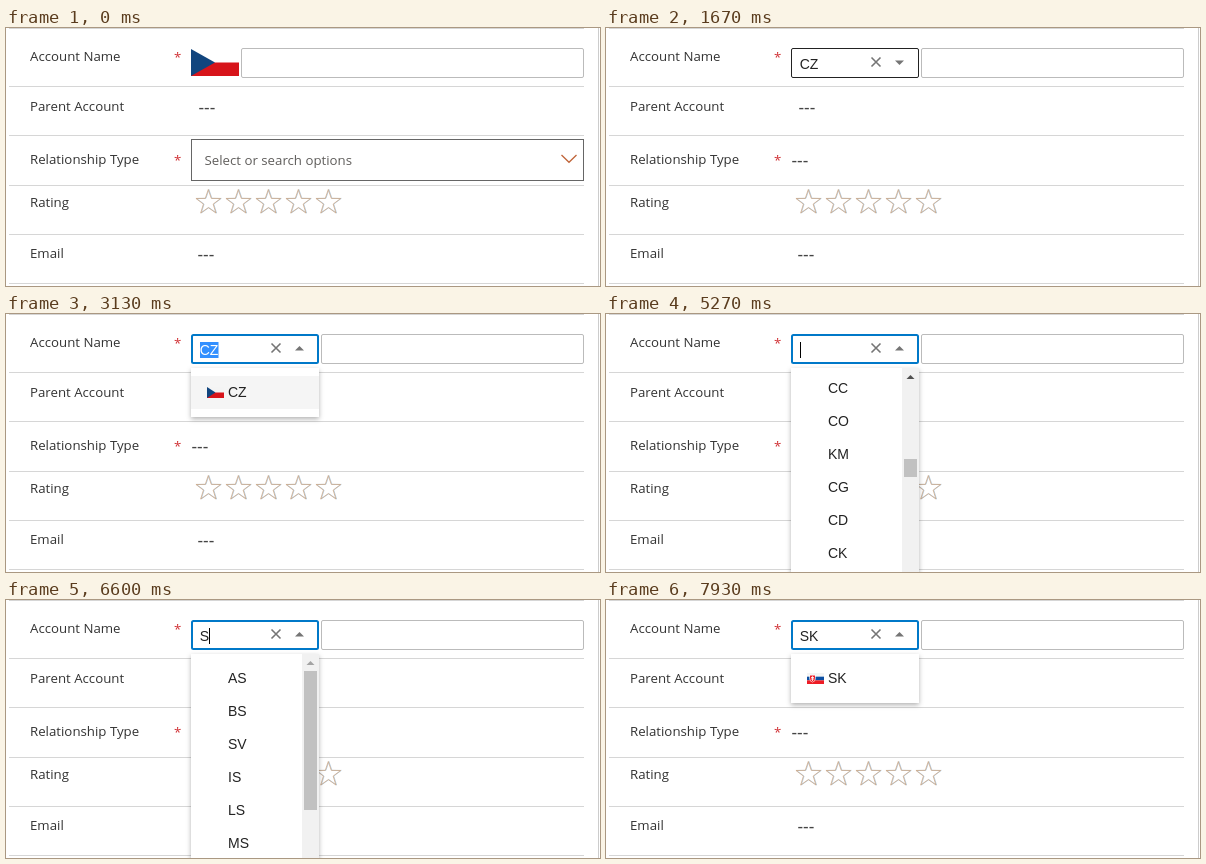
An HTML page that plays this animation: 594x258 px, repeating every 8 s.

```html
<!DOCTYPE html>
<html lang="en">
<head>
<meta charset="utf-8">
<title>Country picker form</title>
<style>
html, body { margin: 0; width: 100%; height: 100%; overflow: hidden; background: #fff; }
svg { display: block; width: 594px; height: 258px; }
text { font: 13.25px "Open Sans", sans-serif; fill: #333; white-space: pre; }
.dash { font-size: 17.4px; fill: #444; }
.hint { fill: #605e5c; }
.star { fill: #d13438; }
.opt { font: 14px "Liberation Sans", Arial, sans-serif; fill: #222; }
.panel { fill: #fff; filter: drop-shadow(0 2px 2.5px rgba(0,0,0,.3)); }
</style>
</head>
<body>
<svg id="stage" viewBox="0 0 594 258"></svg>
<script>
const LOOP = 8000;
const stage = document.getElementById('stage');

const rect = (x, y, w, h, fill, extra = '') =>
  `<rect x="${x}" y="${y}" width="${w}" height="${h}" fill="${fill}" ${extra}/>`;
const box = (x, y, w, h, color, lw = 1, r = 1.5) =>
  rect(x + lw / 2, y + lw / 2, w - lw, h - lw, '#fff', `stroke="${color}" stroke-width="${lw}" rx="${r}"`);
const fill = (color, d) => `<path d="${d}" fill="${color}"/>`;
const line = (color, d, lw = 1) => `<path d="${d}" fill="none" stroke="${color}" stroke-width="${lw}"/>`;
const dot = (color, x, y, r) => `<circle cx="${x}" cy="${y}" r="${r}" fill="${color}"/>`;
const text = (x, y, s, cls = '', extra = '') => `<text x="${x}" y="${y}" class="${cls}" ${extra}>${s}</text>`;
const dashes = (x, y) => text(x, y, '---', 'dash');

// Flags are drawn in a 17 x 11 box.
const W = 17, H = 11;
const stripes = (...colors) =>
  colors.map((c, i) => rect(0, i * H / colors.length, W, H / colors.length, c)).join('');
const hoist = (color, x = 7) => fill(color, `M0 0L${x} 5.5L0 11z`);
const ensign = rect(0, 0, W, H, '#0b1f6b') +
  line('#fff', 'M0 0L8 5.5M8 0L0 5.5M4 0V5.5M0 2.75H8', 1.6) + line('#c8102e', 'M4 0V5.5M0 2.75H8', .8);
const flags = {
  CZ: rect(0, 0, W, H, '#f4f4f4') + rect(0, 5.5, W, 5.5, '#d7141a') + hoist('#11457e', 8.5),
  CC: rect(0, 0, W, H, '#08780f') + dot('#ffd92e', 3.5, 3, 1.4) + dot('#ffd92e', 8.5, 5.5, 1.8) +
    dot('#08780f', 9.2, 5.5, 1.4) + [[13, 2.2], [11.5, 5], [14.8, 4.5], [13, 8.8]].map(p => dot('#fff', ...p, .65)).join(''),
  CO: rect(0, 0, W, H, '#fcd116') + rect(0, 5.5, W, 2.75, '#003893') + rect(0, 8.25, W, 2.75, '#ce1126'),
  KM: stripes('#ffc61e', '#fff', '#ce1126', '#3a75c4') + hoist('#3d8e33', 8.5) + dot('#fff', 3, 5.5, 1.8) + dot('#3d8e33', 3.8, 5.5, 1.4),
  CG: rect(0, 0, W, H, '#fbde4a') + fill('#009543', 'M0 0H11L0 11z') + fill('#dc241f', 'M17 0V11H6z'),
  CD: rect(0, 0, W, H, '#1e8ee6') + line('#f7d618', 'M0 11L17 0', 4) + line('#ce1021', 'M0 11L17 0', 2.6) + dot('#f7d618', 3, 2.8, 1.6),
  CK: ensign + '<circle cx="12" cy="6" r="2.7" fill="none" stroke="#fff" stroke-width="1.5"/>',
  AS: rect(0, 0, W, H, '#0b1f6b') + fill('#bd1021', 'M17 0V11L0 5.5z') + fill('#fff', 'M17 1V10L2.5 5.5z') +
    fill('#8a5a2b', 'M9 5L15 3.5L14 6.5L11 7.5z'),
  BS: stripes('#1fa5b5', '#ffc72c', '#1fa5b5') + hoist('#111', 8),
  SV: stripes('#2f6fc4', '#fff', '#2f6fc4') + dot('#7c9a6a', 8.5, 5.5, 1.4),
  IS: rect(0, 0, W, H, '#02529c') + line('#fff', 'M6 0V11M0 5.5H17', 3.2) + line('#dc1e35', 'M6 0V11M0 5.5H17', 1.6),
  LS: stripes('#00209f', '#fff', '#009543') + fill('#111', 'M8.5 3.6L10.6 7.2H6.4z'),
  MS: ensign + fill('#5fb3e0', 'M10.5 3.2H14.5V6Q14.5 8 12.5 9Q10.5 8 10.5 6z') + rect(11.9, 4, 1.2, 4, '#3b7d3b'),
  SK: stripes('#f4f4f4', '#0b4ea2', '#ee1c25') + fill('#fff', 'M2.4 2H8.6V6Q8.6 8.4 5.5 9.6Q2.4 8.4 2.4 6z') +
    fill('#ee1c25', 'M3 2.6H8V6Q8 8 5.5 9Q3 8 3 6z') + line('#fff', 'M5.5 3.2V8M4 4.5H7M3.7 6H7.3', .8)
};

function option(code, y, showFlag) {
  const flag = showFlag ? `<g transform="translate(201 ${y - 5})">${flags[code]}</g>` : '';
  return flag + text(222, y + 5, code, 'opt');
}

function starShape(cx, cy) {
  let d = '';
  for (let i = 0; i < 10; i++) {
    const a = i * Math.PI / 5, r = i % 2 ? 5.1 : 13;
    d += (i ? 'L' : 'M') + (cx + r * Math.sin(a)).toFixed(2) + ' ' + (cy - r * Math.cos(a)).toFixed(2);
  }
  return d + 'z';
}
const stars = [0, 1, 2, 3, 4].map(i =>
  line('#a8c4dc', starShape(202.9 + i * 30, 174.5), .8) +
  line('#cfa987', starShape(202.3 + i * 30, 174.5), .8)).join('');

const form =
  rect(0, 0, 594, 258, '#fff') +
  [0, 58, 107, 157, 206, 255].map(y => rect(3, y, 575, 1, '#d6d6d6')).join('') +
  rect(592, 0, 1, 258, '#ccc') +
  [['Account Name', 33], ['Parent Account', 83], ['Relationship Type', 136], ['Rating', 179], ['Email', 230]]
    .map(([s, y]) => text(24, y, s)).join('') +
  text(168, 34, '*', 'star') + text(168, 137, '*', 'star') +
  stars + dashes(191.5, 233);

const parentField = hovered => !hovered ? dashes(192.5, 85.5) :
  box(185, 62, 393, 35, '#666', 1, 0) + text(198.5, 84, 'Look for Account', 'hint') +
  '<circle cx="565" cy="77" r="4.5" fill="none" stroke="#b5653a"/>' + line('#b5653a', 'M561.8 80.2L557 85');

const typeField = hovered => !hovered ? dashes(185.5, 138.5) :
  box(185, 111, 393, 42, '#666', 1, 0) + text(198.5, 137, 'Select or search options', 'hint') +
  line('#c0653a', 'M555.5 127L563 134.3L570.5 127', 1.3);

function combo(value, open, caretX, selected) {
  const arrow = open ? 'M289 36.5H298L293.5 32z' : 'M289 32.5H298L293.5 37z';
  return box(185, 20, 128, 30, open ? '#0078c8' : '#222', open ? 2 : 1) +
    box(315, 20, 263, 30, '#bbb') +
    (selected ? rect(194, 28, 18.5, 16, '#3390ff') : '') +
    text(193.7, 41, value, 'opt', selected ? 'style="fill:#fff"' : '') +
    (caretX ? rect(caretX, 28, 1, 16, '#000') : '') +
    line('#757575', 'M265.5 29.5L274.5 38.5M274.5 29.5L265.5 38.5', 1.6) +
    fill('#757575', arrow);
}

const panel = h => rect(185, 54, 128, h, '#fff', 'class="panel"');
const single = (code, showFlag, active) =>
  panel(49) + (active ? rect(185, 62, 128, 33, '#f5f5f5') : '') + option(code, 78, showFlag);

function list(codes, top, showFlags, thumbY, thumbH) {
  return panel(230) +
    codes.map((c, i) => option(c, top + i * 33, showFlags)).join('') +
    rect(296, 54, 17, 204, '#f1f1f1') +
    fill(thumbY > 71 ? '#505050' : '#a3a3a3', 'M300.5 65H308.5L304.5 61z') +
    rect(298, thumbY, 13, thumbH, '#c1c1c1');
}

const C_LIST = ['CC', 'CO', 'KM', 'CG', 'CD', 'CK'];
const S_LIST = ['AS', 'BS', 'SV', 'IS', 'LS', 'MS'];

function draw(t) {
  // The caret blinks every 530 ms, restarting at each edit.
  const caret = (x, since) => Math.floor((t - since) / 530 + .001) % 2 ? 0 : x;
  let s = form + parentField(t >= 130 && t < 330) + typeField(t < 130);
  if (t < 1670)
    s += rect(185, 34.5, 48, 13.5, '#d7141a') + fill('#11457e', 'M185 21L209 34.5L185 48z') + box(235, 20, 343, 30, '#bbb');
  else if (t < 3000) s += combo('CZ', false);
  else if (t < 5270) s += combo('CZ', true, 0, true) + single('CZ', t >= 3130, true);
  else if (t < 6600) s += combo('', true, caret(194, 5270)) + list(C_LIST, 74, t >= 5330, 145, 18);
  else if (t < 7400) s += combo('S', true, caret(203, 6600)) + list(S_LIST, 78, t >= 6730, 71, 139);
  else s += combo('SK', true, caret(212, 7400)) + single('SK', true, false);
  return s;
}

let shown = '';
const start = performance.now();
function tick() {
  const markup = draw((performance.now() - start) % LOOP);
  if (markup !== shown) stage.innerHTML = shown = markup;
  requestAnimationFrame(tick);
}
tick();
</script>
</body>
</html>
```
